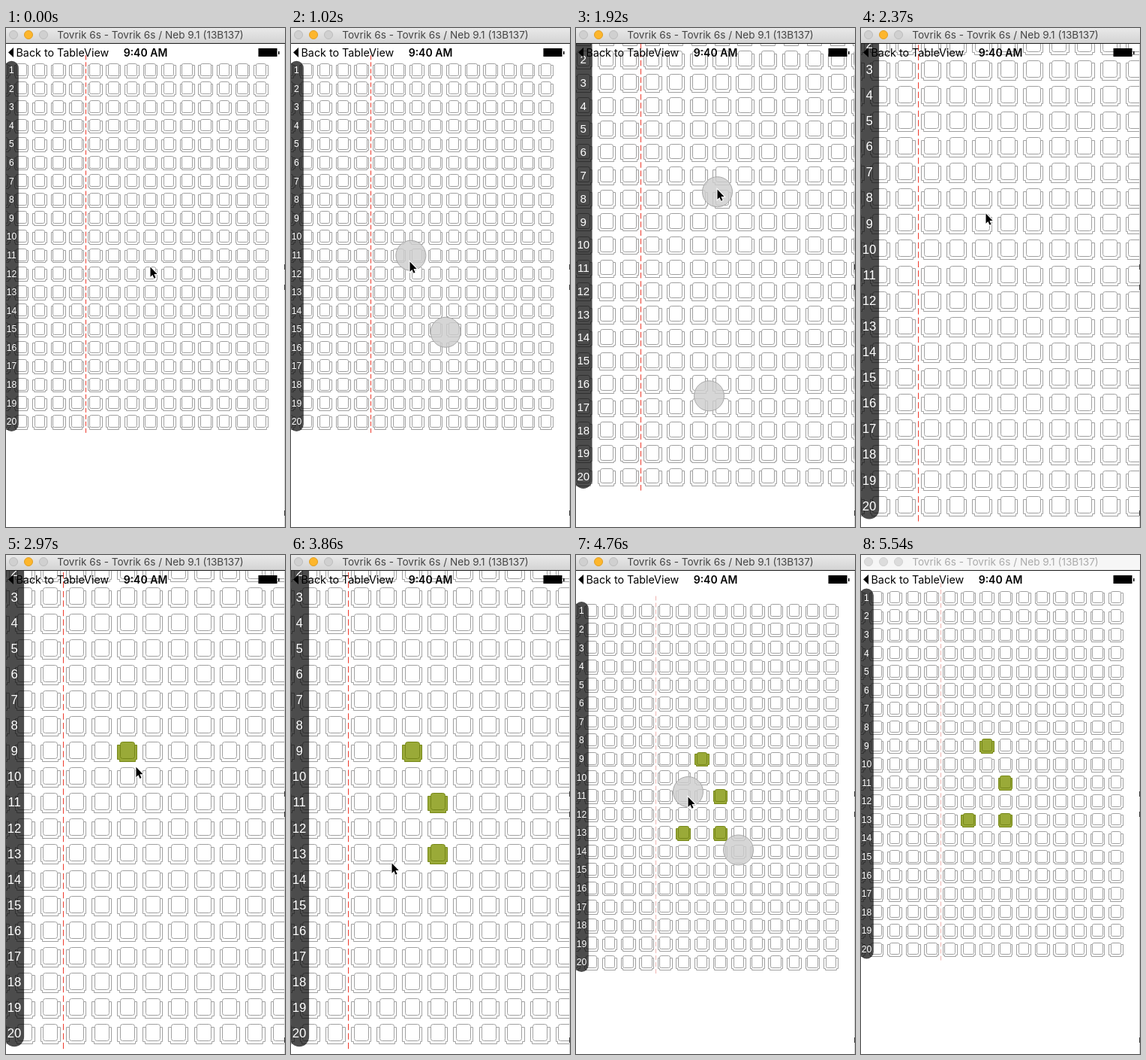
An HTML page with a canvas that plays this animation: 372x663 px, repeating every 5.64 s.

```html
<!DOCTYPE html>
<html lang="en">
<head>
<meta charset="utf-8">
<title>Seat picker</title>
<style>
html, body { margin: 0; width: 100%; height: 100%; overflow: hidden; background: #fff; }
canvas { display: block; }
</style>
</head>
<body>
<canvas id="stage" width="372" height="663"></canvas>
<script>
const c = document.getElementById('stage').getContext('2d');
const LOOP = 5640, ROWS = 20, COLS = 20, PICK = 2670, INACTIVE = 5540;

// time, x, y of the pointer tip
const pointer = [
  [0, 192, 317], [150, 192, 317], [600, 184, 202], [1020, 158, 310],
  [1250, 155, 332], [1620, 193, 251], [1920, 188, 214], [2370, 166, 246],
  [2820, 162, 258], [3270, 195, 328], [3720, 195, 394], [3860, 134, 409],
  [4160, 134, 409], [4310, 156, 224], [4760, 149, 321], [LOOP, 149, 321]
];
// time, zoom from 0 (whole hall) to 1
const zoom = [[0, 0], [1320, 0], [1620, -0.045], [2070, 1], [4160, 1], [4760, 0], [LOOP, 0]];
// time, row, column right of the centre line
const picks = [[PICK, 8, 2], [3270, 10, 3], [3570, 12, 3], [4160, 12, 1]];

const mix = (a, b, f) => a + (b - a) * f;
const snap = v => Math.floor(v) + 0.5;
const between = (t, a, b) => t >= a && t <= b;

// The screen updates every 150 ms, counted anew from these times.
function step(t) {
  const from = [0, 1020, 3860, 4160, INACTIVE].findLast(s => s <= t);
  return from + Math.floor((t - from) / 150) * 150;
}

function at(keys, t) {
  const i = Math.max(1, keys.findIndex(k => k[0] >= t));
  const a = keys[i - 1], b = keys[i], f = (t - a[0]) / (b[0] - a[0]);
  return a.slice(1).map((v, n) => mix(v, b[n + 1], f));
}

function rect(x, y, w, h, color) {
  c.fillStyle = color;
  c.fillRect(x, y, w, h);
}

function text(s, x, y, font, color, align = 'left') {
  c.font = font + ', sans-serif';
  c.fillStyle = color;
  c.textAlign = align;
  c.fillText(s, x, y);
}

function disc(x, y, r, fill, edge) {
  c.beginPath();
  c.arc(x, y, r, 0, 7);
  c.fillStyle = fill;
  c.fill();
  c.lineWidth = 1;
  c.strokeStyle = edge;
  c.stroke();
}

function poly(points, fill) {
  c.beginPath();
  points.forEach(([x, y]) => c.lineTo(x, y));
  c.closePath();
  c.fillStyle = fill;
  c.fill();
}

// Half of the armrest and cushion outline; the other half mirrors it.
const half = [[-9.5, -9.5], [-13, -9.5], [-13, 10], [-10.5, 10], [-10.5, 13]];
const frame = [...half, ...half.map(([x, y]) => [-x, y]).reverse()];

function seat(x, y, s, picked) {
  const px = u => snap(x + u * s), py = v => snap(y + v * s);
  c.lineWidth = 1;
  c.strokeStyle = picked ? '#768719' : '#a0a0a0';
  poly(frame.map(([u, v]) => [px(u), py(v)]), picked ? '#9aaa38' : '#fff');
  c.stroke();
  c.beginPath();
  c.roundRect(px(-9.5), py(-13), px(9.5) - px(-9.5), py(9) - py(-13), 3 * s);
  c.fill();
  c.stroke();
}

function hall(t) {
  const [z] = at(zoom, t);
  const pitch = mix(24.58, 34.1, z), mid = mix(106.5, 76.5, z), s = pitch / 34.1;
  const bounce = 17.5 * Math.max(0, 1 - Math.abs(t - 4760) / 200);
  const top = mix(56, -13, z) + (t >= PICK ? 0.7 : 0) + bounce;

  for (let r = 0; r < ROWS; r++) {
    for (let i = -COLS / 2; i < COLS / 2; i++) {
      const picked = picks.some(k => t >= k[0] && k[1] === r && k[2] === i);
      seat(mid + (i + 0.5) * pitch, top + r * pitch + s, s, picked);
    }
  }

  c.setLineDash([8.3 * s, 4.2 * s]);
  c.strokeStyle = t >= 4310 || between(t, 1320, 1770) ? '#f0b4b0' : '#ee3b2c';
  c.beginPath();
  c.moveTo(snap(mid), top - 0.8 * pitch);
  c.lineTo(snap(mid), top + 19.68 * pitch);
  c.stroke();
  c.setLineDash([]);

  const w = 0.765 * pitch;
  c.fillStyle = 'rgba(0,0,0,.7)';
  c.beginPath();
  c.roundRect(-2, top - pitch / 2, w, ROWS * pitch + 0.6, w / 2);
  c.fill();
  for (let r = 0; r < ROWS; r++) {
    text(r + 1, w / 2 - 2, top + (r + 0.17) * pitch,
      `${0.49 * pitch}px "Liberation Sans"`, '#fff', 'center');
  }
}

function status() {
  poly([[3, 32.5], [10, 26], [10, 39]], '#000');
  text('Back to TableView', 13.5, 37.5, '14.3px Inter', '#000');
  text('9:40 AM', 186, 37.5, '600 14px Inter', '#000', 'center');
  rect(336.5, 27, 25, 11, '#000');
  rect(363, 31, 1.5, 4, '#000');
}

function titleBar(active) {
  const g = c.createLinearGradient(0, 0, 0, 20);
  g.addColorStop(0, active ? '#e9e9e9' : '#f6f6f6');
  g.addColorStop(1, active ? '#d3d3d3' : '#f6f6f6');
  rect(0, 0, 372, 20, g);
  rect(0, 20, 372, 1, '#1a1a1a');
  [10, 30, 50].forEach((x, i) => {
    const lit = active && i === 1;
    disc(x, 9, 5.5, lit ? '#fdb62c' : active ? '#d0d0d0' : '#dcdcdc',
      lit ? '#e09e22' : active ? '#bcbcbc' : '#d0d0d0');
  });
  text('Tovrik 6s - Tovrik 6s / Neb 9.1 (13B137)', 192.5, 14,
    '13.6px Inter', active ? '#444' : '#aaa', 'center');
}

// Two fingers mirrored about one point, trailing the pointer a little.
function touches(t) {
  const [x, y] = at(pointer, t - 30);
  for (const [u, v] of [[x, y], [366 - x, 706.5 - y]]) {
    disc(u, v, 20, 'rgba(206,206,206,.82)', '#a8a8a8');
  }
}

function arrow(x, y) {
  const shape = [[0, 0], [0, 14], [3, 11], [5.3, 16], [7.4, 15], [5.2, 10], [9.6, 10]]
    .map(([u, v]) => [x + 0.5 + u * 0.95, y + 0.5 + v * 0.95]);
  poly(shape, '#000');
  c.lineWidth = 2;
  c.strokeStyle = '#fff';
  c.stroke();
  c.fill();
}

function draw(now) {
  const t = step(now % LOOP);
  rect(0, 0, 372, 663, '#fff');
  c.save();
  c.beginPath();
  c.rect(0, 21, 371, 642);
  c.clip();
  hall(t);
  status();
  if (between(t, 450, 1920) || between(t, 4310, 4760)) touches(t);
  c.restore();
  rect(371, 21, 1, 642, '#cfcfcf');
  for (const y of [314, 341, 641]) rect(371, y, 1, 7, '#333');
  titleBar(t < INACTIVE);
  if (t < INACTIVE) arrow(...at(pointer, t));
}

const start = performance.now();
function tick() {
  draw(performance.now() - start);
  requestAnimationFrame(tick);
}
tick();
</script>
</body>
</html>
```
